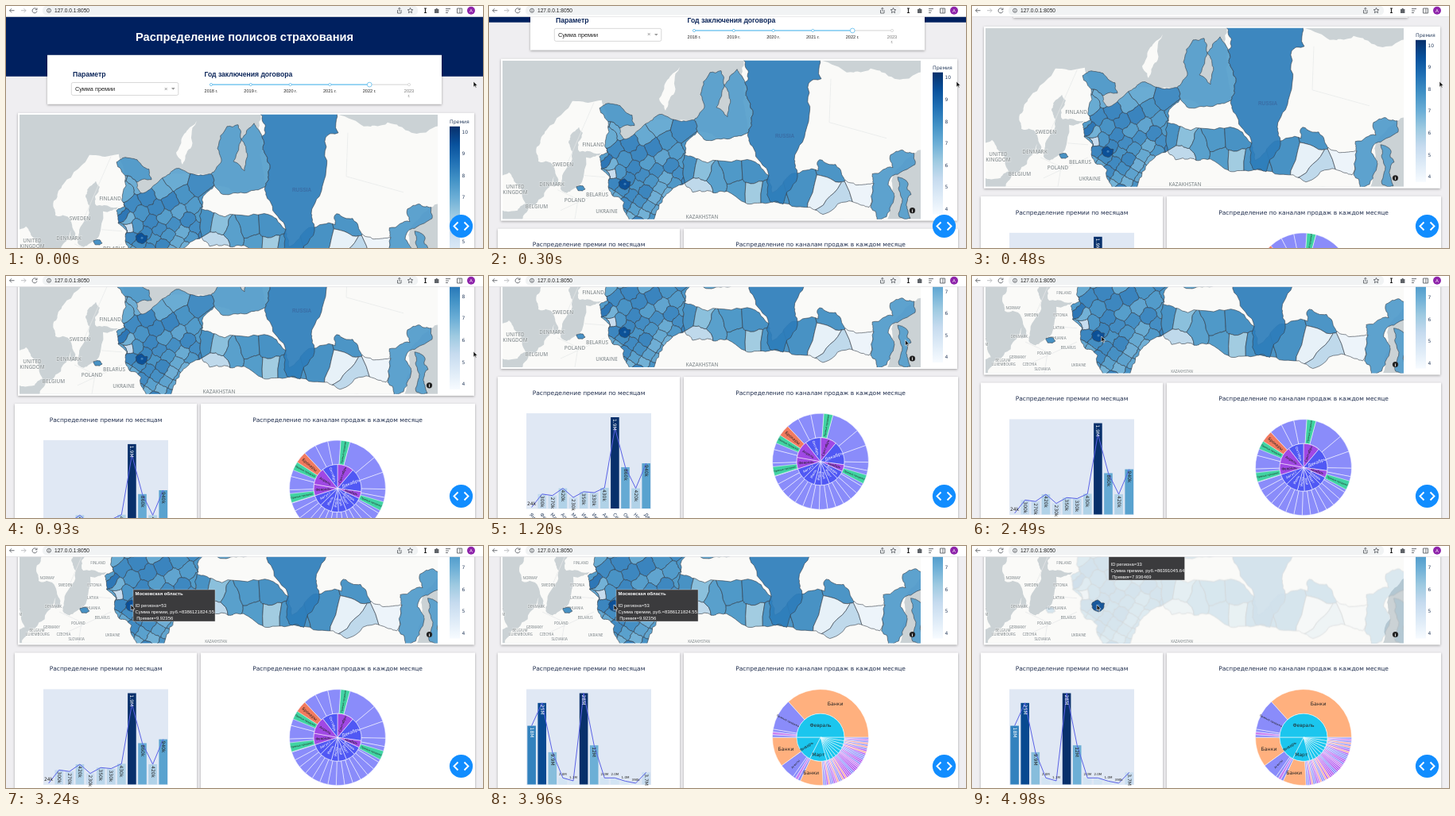
An HTML page for the animation above (5010 ms loop, 600 px wide and 305 px high).

```html
<!DOCTYPE html>
<html lang="ru">
<head>
<meta charset="utf-8">
<style>
html, body { margin: 0; width: 100%; height: 100%; overflow: hidden; background: #efeef1; }
svg { display: block; width: 600px; height: 305px; }
text { font-family: "Liberation Sans", Arial, sans-serif; }
.plot { font-family: "DejaVu Sans", Verdana, sans-serif; }
.geo { font-family: "Open Sans", sans-serif; font-weight: 600; fill: #8d9496; stroke: #fff; stroke-width: 1; stroke-opacity: .6; paint-order: stroke; }
.mid { text-anchor: middle; }
.region { stroke: #333b45; stroke-width: .6; fill-opacity: .92; vector-effect: non-scaling-stroke; stroke-linejoin: round; }
.card { fill: #fff; filter: drop-shadow(0 1px 1.5px #0005); }
</style>
</head>
<body>
<svg id="stage" viewBox="0 0 600 305"></svg>
<script>
const LOOP = 5010;
const BLUES = ['f7fbff', 'deebf7', 'c6dbef', '9ecae1', '6baed6', '4292c6', '2171b5', '08519c', '08306b'];
const clamp = (v, a = 0, b = 1) => Math.min(b, Math.max(a, v));
const smooth = u => u * u * (3 - 2 * u);
const mix = (a, b, f) => a.map((c, k) => c + (b[k] - c) * f);

function blues(t) {
  const p = clamp(t) * 8, i = Math.min(7, Math.floor(p));
  const rgb = hex => [0, 2, 4].map(k => parseInt(hex.slice(k, k + 2), 16));
  return `rgb(${mix(rgb(BLUES[i]), rgb(BLUES[i + 1]), p - i).map(Math.round)})`;
}
const premiumColor = v => blues((v - 3.73) / 6.47);

function hash(x, y) {
  const s = Math.sin(x * 12.9898 + y * 78.233) * 43758.5453;
  return s - Math.floor(s);
}

const text = (x, y, size, str, attrs = '') => `<text x="${x}" y="${y}" font-size="${size}" ${attrs}>${str}</text>`;
const rect = (x, y, w, h, fill, attrs = '') => `<rect x="${x}" y="${y}" width="${w}" height="${h}" fill="${fill}" ${attrs}/>`;
const parse = str => str.split(' ').map(p => p.split(',').map(Number));

/* Map: key points roughened into natural borders, split into Voronoi districts */

// Midpoint displacement seeded by the edge itself, so neighbours share borders.
function rough(points, depth = 3) {
  for (; depth > 0; depth--) {
    points = points.flatMap((p, i) => {
      const q = points[(i + 1) % points.length], [mx, my] = mix(p, q, .5);
      const amp = Math.min(5, Math.hypot(q[0] - p[0], q[1] - p[1]) * .3);
      const kx = Math.round(mx), ky = Math.round(my);
      return [p, [mx + (hash(kx, ky) - .5) * amp, my + (hash(ky, kx) - .5) * amp]];
    });
  }
  return 'M' + points.map(p => p.map(c => c.toFixed(1)).join(' ')).join('L') + 'Z';
}
const shape = (points, fill, attrs = '') => `<path d="${rough(points)}" fill="${fill}" ${attrs}/>`;
const region = (points, v) => shape(points, premiumColor(v), 'class="region"');

function voronoiCell([x, y], sites) {
  let cell = parse('100,100 600,100 600,400 100,400');
  for (const [sx, sy] of sites) {
    if (sx === x && sy === y) continue;
    const side = p => (p[0] - (x + sx) / 2) * (sx - x) + (p[1] - (y + sy) / 2) * (sy - y);
    cell = cell.flatMap((p, i) => {
      const q = cell[(i + 1) % cell.length], a = side(p), b = side(q);
      const kept = a < 0 ? [p] : [];
      if (a < 0 !== b < 0) kept.push(mix(p, q, a / (a - b)));
      return kept;
    });
  }
  return cell;
}

function districts(id, outline, sites) {
  const border = rough(parse(outline));
  return `<clipPath id="${id}"><path d="${border}"/></clipPath>
    <g clip-path="url(#${id})">${sites.map(s => region(voronoiCell(s, sites), s[2])).join('')}</g>
    <path d="${border}" fill="none" class="region"/>`;
}

const LAND = [
  '40,340 50,322 72,300 82,283 81,296 88,294 80,268 62,264 60,246 72,225 105,188 142,187 150,214 164,222 170,236 184,228 206,212 258,212 262,226 300,236 326,228 322,165 319,130 402,130 450,152 480,147 510,160 560,150 560,250 535,254 508,282 510,308 500,340',
  '222,200 214,185 222,165 240,145 232,180',
  '10,284 25,278 34,292 46,318 36,326 10,328'
];
const BALTIC = '105,228 113,221 118,228 112,240 114,252 145,253 122,259 114,294 98,304 90,299 92,286 105,252 100,240';
const EUROPE = '164,222 170,236 184,228 206,212 214,205 235,212 258,212 262,226 248,240 246,256 248,290 228,302 214,318 206,340 176,340 170,316 156,308 150,296 152,284 141,274 139,258 149,253 147,236 150,214';
const SIBERIA = '246,256 275,266 330,263 352,282 356,304 385,279 414,276 416,262 436,268 447,287 462,294 484,292 478,322 453,314 420,331 404,322 362,316 327,318 300,302 285,304 256,303 246,292';
const YAMAL = '258,212 270,198 266,180 278,152 292,150 296,170 286,196 300,208 302,182 296,168 312,148 322,165 325,185 332,205 326,228 300,236 280,238 262,226';
const YENISEI = '319,130 326,150 322,165 325,185 332,205 326,228 332,246 352,282 353,314 370,318 388,284 384,262 402,214 402,166 418,160 418,130';
const KOLA = '139,197 150,191 165,194 180,206 183,219 164,222 150,214';
const FAR_EAST = '484,292 482,280 508,272 505,256 518,250 535,254 536,268 508,282 502,294 510,308 500,334 488,337 480,322';
const SAKHALIN = '514,284 526,290 531,306 526,324 530,336 516,334 520,312';
const MOSCOW = '163,291 170,286 178,290 176,297 171,300 165,297';

// Small districts crowd towards the south; two north-western ones stand out.
const EUROPE_SITES = [[148, 264, 8.7], [155, 279, 5.4]];
for (let i = 0; i < 68; i++) {
  EUROPE_SITES.push([137 + 124 * (i * .618 % 1), 206 + 136 * ((i + .5) / 68) ** .6, 7 + 1.4 * hash(i, 5)]);
}
const SIBERIA_SITES = parse('250,274,8 264,296,5.6 268,278,6.6 285,286,7.6 305,278,7.8 312,302,7.7 333,278,8 334,302,6.2 352,304,7.9 398,292,8 428,272,7.9 421,297,4.3 438,313,5.6 468,304,4.1');

const LABELS = '131,245,FINLAND 93,270,SWEDEN 79,295,DENMARK 33,298,UNITED 33,305,KINGDOM 60,323,BELGIUM 108,315,POLAND 136,308,BELARUS 148,329,UKRAINE 268,336,KAZAKHSTAN';
const NEAR_LABELS = '72,262,NORWAY 127,270,ESTONIA 125,285,LATVIA 123,297,LITHUANIA 77,319,GERMANY 61,328,LUXEMBOURG 91,328,CZECHIA 106,333,SLOVAKIA';
const geoLabels = rows => rows.split(' ').map(row => {
  const [x, y, name] = row.split(',');
  return `<text x="${x}" y="${y}" class="geo mid">${name}</text>`;
}).join('');

function mapCard() {
  let ticks = '';
  for (let v = 4; v <= 10; v++) ticks += text(573.5, 160.8 + (10 - v) * 27.6, 6, v, 'class="plot" fill="#2a3f5f"');
  return rect(15, 135, 574, 204, '#fff', 'class="card"') +
    `<g clip-path="url(#mapBox)">
      ${rect(17, 137, 526, 200, '#cbd2d5')}
      <g id="map">
        ${LAND.map(s => shape(parse(s), '#fafaf8')).join('')}${shape(parse(BALTIC), '#cbd2d5')}
        <path d="M86 300L112 312 108 337M120 282L146 284M146 300L90 326M98 268L132 190M430 160L428 215 500 235" fill="none" stroke="#e6e8e9" stroke-width=".7"/>
        <g id="labels">${geoLabels(LABELS)}<g id="near">${geoLabels(NEAR_LABELS)}</g></g>
        <g id="regions">
          ${districts('europe', EUROPE, EUROPE_SITES)}${districts('siberia', SIBERIA, SIBERIA_SITES)}
          ${region(parse(KOLA), 7.6)}${region(parse(YAMAL), 7.4)}${region(parse(YENISEI), 8.3)}
          ${region(parse(FAR_EAST), 7.5)}${region(parse(SAKHALIN), 7.4)}${region(parse('110,296 118,295 121,299 112,301'), 8)}
        </g>
        ${region(parse(MOSCOW), 9.5)}<circle cx="171" cy="292.5" r="1.5" fill="#3f7fba"/>
      </g>
      ${text(372, 234, 6.4, 'RUSSIA', 'id="russia" class="mid" fill="#3a6ea5" font-weight="700"')}
      <circle cx="532.5" cy="326" r="3.6" fill="#222"/>${text(532.5, 328.4, 6, 'i', 'class="mid" fill="#fff" font-weight="700"')}
    </g>` +
    text(558, 148, 6.2, 'Премия', 'class="plot" fill="#2a3f5f"') +
    rect(558, 152, 13, 179, 'url(#blues)') + ticks;
}

/* Controls */
function controls() {
  let slider = rect(258, 98.4, 250, 1.8, '#e6e6e6', 'rx="1"') + rect(258, 98.4, 199, 1.8, '#8fd2f5', 'rx="1"');
  for (let i = 0; i < 6; i++) {
    const x = 258 + i * 49.8, past = i < 5, ink = `class="mid" fill="${past ? '#222' : '#777'}"`;
    slider += `<circle cx="${x}" cy="99.3" r="${i === 4 ? 2.9 : 1.6}" fill="#fff" stroke="${past ? '#7cc8f0' : '#dcdcdc'}"/>` +
      text(x, 109.3, 5.6, `${2018 + i}${past ? ' г.' : ''}`, ink) + (past ? '' : text(x, 115.5, 5.6, 'г.', ink));
  }
  const heading = 'fill="#0b2559" font-weight="700"';
  return rect(0, 0, 600, 89, '#00205f') +
    text(300, 44, 14.6, 'Распределение полисов страхования', 'class="mid" fill="#fff" font-weight="700"') +
    rect(52, 62, 496, 62, '#fff', 'class="card"') +
    text(84, 89, 8.6, 'Параметр', heading) + text(249.5, 89, 8.6, 'Год заключения договора', heading) +
    rect(82.3, 96.7, 134.5, 16, '#fff', 'rx="2" stroke="#c8c8c8" stroke-width=".7"') +
    text(87, 107.3, 7.3, 'Сумма премии', 'fill="#222"') +
    text(199, 106.8, 7.5, '×', 'fill="#888"') + '<path d="M208 103.3h4.6l-2.3 2.6z" fill="#999"/>' + slider;
}

/* Bar charts */
const MONTHS = 'Янв Фев Мар Апр Май Июн Июл Авг Сен Окт Ноя Дек'.split(' ');
const ALL_SALES = { labels: '24k 300k 270k 420k 230k 350k 330k 430k 1.9M 860k 420k 940k', top: 1.9e6, peak: .88, flat: 1e5, small: 6 };
const REGION_SALES = { labels: '18M 25M 9.9M 2.0M 1.1M 28M 12M 2.0M 2.0M 1.0M 390k 3.7M', top: 28e6, peak: 1, flat: 3e6, small: 4 };

function barChart(id, { labels, top, peak, flat, small }) {
  const base = 515, line = [];
  let bars = '', marks = '';
  labels.split(' ').forEach((label, i) => {
    const value = parseFloat(label) * (label.endsWith('M') ? 1e6 : 1e3);
    const t = value / top, h = t * 115, x = 53.6 + i * 13.1, y = base - h;
    bars += rect(x - 5.3, y, 10.6, h, blues(.12 + .88 * t));
    line.push(`${x} ${base - h * (t === 1 ? peak : 1)}`);
    marks += value < flat ? text(x, y - 3, small, label, 'class="plot mid" fill="#222"')
      : text(0, 0, 6, label, `class="plot" fill="${t > .55 ? '#fff' : '#222'}" transform="translate(${x - 2} ${y + 2}) rotate(90)"`);
    marks += text(0, 0, 6, MONTHS[i], `class="plot" fill="#2a3f5f" transform="translate(${x - 3} 523) rotate(45)"`);
  });
  return `<g id="${id}">${rect(47, 395, 157, 120.5, '#e0e8f4')}${bars}
    <path d="M${line.join('L')}" fill="none" stroke="#5a62e6"/>${marks}</g>`;
}

/* Sunbursts: angles in degrees, counter-clockwise from the right */
const CX = 417, CY = 455.7, INNER = 30, OUTER = 60.5;
const VIOLET = '#8a8cfa', GREEN = '#40d3a2', BLUE = '#5058f4', PURPLE = '#a048e4', ORANGE = '#ffb07e', CYAN = '#1bc6ee';
const polar = (r, a) => [CX + r * Math.cos(a * Math.PI / 180), CY - r * Math.sin(a * Math.PI / 180)];

function sector(r0, r1, from, to, fill) {
  const large = from - to > 180 ? 1 : 0, p = (r, a) => polar(r, a).map(c => c.toFixed(2)).join(' ');
  return `<path d="M${p(r1, from)}A${r1} ${r1} 0 ${large} 1 ${p(r1, to)}L${p(r0, to)}A${r0} ${r0} 0 ${large} 0 ${p(r0, from)}Z" fill="${fill}" stroke="#fff" stroke-width=".5"/>`;
}
function tag(r, a, size, str, ink = '#222', radial = true) {
  const [x, y] = polar(r, a), turn = !radial ? 0 : Math.cos(a * Math.PI / 180) < 0 ? 180 - a : -a;
  return text(0, size * .35, size, str, `class="plot mid" fill="${ink}" transform="translate(${x} ${y}) rotate(${turn})"`);
}
const outer = (from, to, fill) => sector(INNER, OUTER, from, to, fill);
const inner = (from, to, fill) => sector(0, INNER, from, to, fill);
// Fills an arc with slices about `step` degrees wide.
function slices(draw, from, to, step, colorOf) {
  const n = Math.round((from - to) / step), w = (from - to) / n;
  let out = '';
  for (let i = 0; i < n; i++) out += draw(from - i * w, from - (i + 1) * w, colorOf(i));
  return out;
}

function allChannels() {
  const violet = () => VIOLET;
  let out = outer(75, 40, VIOLET) + slices(outer, 40, -1, 20, violet) + slices(outer, -1, -162, 10, violet) +
    slices(outer, -162, -227, 15, violet) + slices(outer, -227, -274, 16, violet);
  for (const mid of [80.5, -22, -168, -208]) out += outer(mid + 5.5, mid - 5.5, GREEN) + tag(46, mid, 3, 'Прямые продажи');
  out += outer(-213, -227, '#f27a5e') + tag(46, -220, 5, 'Брокеры');
  const months = [['Сентябрь', 40, PURPLE], ['Декабрь', 58, BLUE], ['Ноябрь', 17, PURPLE], ['Январь', 20, BLUE],
    ['Март', 23, BLUE], ['Май', 20, BLUE], ['Июнь', 17, BLUE], ['Июль', 30, BLUE], ['Август', 27, BLUE],
    ['Февраль', 28, PURPLE], ['Апрель', 42, PURPLE], ['Октябрь', 38, BLUE]];
  let from = 90;
  for (const [name, span, fill] of months) {
    out += inner(from, from - span, fill) + tag(18, from - span / 2, span > 50 ? 5.4 : 4.3, name, fill === BLUE ? '#fff' : '#222');
    from -= span;
  }
  return `<g id="sunAll">${out}</g>`;
}

function regionChannels() {
  const mixed = i => ['#b45cf0', VIOLET, '#c77df2', VIOLET, '#f7a6a0'][Math.floor(hash(i, 3) * 5)];
  const cyan = () => CYAN;
  return `<g id="sunRegion">${outer(132, 0, ORANGE)}${slices(outer, 0, -87, 2.2, mixed)}${outer(-87, -115, ORANGE)}
    ${slices(outer, -115, -125, 3, mixed)}${outer(-125, -144, VIOLET)}${outer(-144, -180, ORANGE)}
    ${slices(outer, -180, -190, 3, mixed)}${outer(-190, -228, VIOLET)}
    ${inner(180, 0, CYAN)}${slices(inner, 0, -75, 8, cyan)}${inner(-75, -117, CYAN)}${inner(-117, -180, CYAN)}
    ${[66, 199, 255].map(a => tag(46, a, 6.2, 'Банки', '#222', false)).join('')}
    ${tag(46, 153, 3.4, 'Прямые продажи')}${tag(46, 227, 3.6, 'Агенты')}
    ${tag(15, 90, 6, 'Февраль', '#222', false)}${tag(21, 213, 5, 'Январь')}${tag(22, 263, 6, 'Март', '#222', false)}</g>`;
}

function charts() {
  const title = 'class="plot mid" fill="#1f2d4d"';
  return rect(11, 349, 229, 220, '#fff', 'class="card"') + rect(245, 349, 345, 220, '#fff', 'class="card"') +
    text(125.5, 371.7, 7.5, 'Распределение премии по месяцам', title) +
    text(417, 371.7, 7.5, 'Распределение по каналам продаж в каждом месяце', title) +
    barChart('barsAll', ALL_SALES) + barChart('barsRegion', REGION_SALES) + allChannels() + regionChannels();
}

/* Fixed layers */
const browserBar = rect(0, 0, 600, 13.6, '#fff') + rect(46, 0, 472, 11.5, '#f1f3f4', 'rx="5"') + rect(0, 13, 600, .6, '#d9d9dc') +
  `<g fill="none" stroke="#5f6368" stroke-width=".9">
    <path d="M10.5 5.7H4.5M7 3.2L4.5 5.7 7 8.2"/><path d="M19 5.7h6M22.5 3.2L25 5.7 22.5 8.2" stroke="#b8babd"/>
    <path d="M38.6 4.2A3 3 0 1 0 39 6.5M39 2.5v2.2h-2.2"/><circle cx="54" cy="5.7" r="2.5"/><path d="M54 5.3v1.8M54 4v.6"/>
    <path d="M492.5 5v4h4.5V5M494.8 6.8V2.3M493.3 3.6l1.5-1.5 1.5 1.5"/>
    <path d="M508.5 2.3l1 2.2 2.3.2-1.8 1.6.6 2.4-2.1-1.3-2.1 1.3.6-2.4-1.8-1.6 2.3-.2z"/>
    <path d="M553 3.5h6M553 6h4M553 8.500h3M567.5 3h6v6h-6zM571 3v6"/></g>
  <path d="M539 4h1.500a1.200 1.200 0 0 1 2.400 0h1.500v5h-5.400z" fill="#5f6368"/>
  <path d="M526 3h3M527.500 3v5.500M526 8.500h3" stroke="#222" stroke-width="1.200"/>
  <circle cx="585" cy="5.700" r="5" fill="#8e24aa"/>` +
  text(585, 7.8, 5.8, 'A', 'class="mid" fill="#fff"') + text(61, 8, 6.6, '127.0.0.1:8050', 'fill="#222"');

const devButton = `<circle cx="572.5" cy="277.5" r="14.6" fill="#118dff"/>
  <path d="M568.5 272.5l-5 5 5 5M576.5 272.5l5 5-5 5" fill="none" stroke="#fff" stroke-width="1.9"/>`;

function tooltip(id, x, y, w, [name, ...details]) {
  return `<g id="${id}">${rect(x, y, w, 40, '#3b3b3d', 'stroke="#ddd" stroke-width=".4"')}
    ${text(x + 2.5, y + 6.8, 5.9, name, 'fill="#fff" font-weight="700"')}
    ${details.map((s, i) => text(x + 2.5, y + 21.5 + i * 8, 5.9, s, 'fill="#fff"')).join('')}</g>`;
}

document.getElementById('stage').innerHTML = `<defs>
    <linearGradient id="blues" x1="0" y1="1" x2="0" y2="0">${BLUES.map((c, i) => `<stop offset="${i / 8}" stop-color="#${c}"/>`).join('')}</linearGradient>
    <clipPath id="mapBox">${rect(17, 137, 526, 200, '#000')}</clipPath>
  </defs>
  ${rect(0, 0, 600, 305, '#efeef1')}
  <g id="page">${controls()}${mapCard()}${charts()}</g>
  ${tooltip('tipMoscow', 160, 55, 103, ['Московская область', 'ID региона=53', 'Сумма премии, руб.=8386121824.55', '&#160;Премия=9.92356'])}
  ${tooltip('tipNext', 172, 3, 95.5, ['Владимирская область', 'ID региона=33', 'Сумма премии, руб.=86391045.64', '&#160;Премия=7.936469'])}
  ${browserBar}${devButton}
  <path id="cursor" d="M0 0V7.2L1.7 5.7 2.8 8.2 3.9 7.7 2.8 5.3H5z" fill="#111" stroke="#fff" stroke-width=".6"/>`;

/* Timeline: each key is [time, ...values] */
const SCROLL = [[0, 0], [480, 109], [930, 188], [1200, 222], [1530, 222], [1620, 214.5], [LOOP, 214.5]];
const CURSOR = [[0, 588, 95], [1080, 588, 95], [1470, 307, 32], [1980, 307, 32], [2430, 163, 76], [3000, 157, 74], [LOOP, 157, 74]];

function track(keys, t, ease = u => u) {
  const i = keys.findIndex(k => k[0] > t);
  const [t0, ...a] = keys[i - 1], [t1, ...b] = keys[i];
  return mix(a, b, ease((t - t0) / (t1 - t0)));
}

const el = Object.fromEntries([...document.querySelectorAll('#stage [id]')].map(n => [n.id, n]));
const show = (ids, on) => ids.split(' ').forEach(id => { el[id].style.display = on ? '' : 'none'; });

function render(t) {
  el.page.setAttribute('transform', `translate(0 ${-track(SCROLL, t)[0]})`);
  el.cursor.setAttribute('transform', `translate(${track(CURSOR, t, smooth)})`);

  const zoom = 1 + .083 * smooth(clamp((t - 1680) / 360)), close = zoom > 1.05;
  el.map.setAttribute('transform', `translate(315 329.5) scale(${zoom}) translate(-315 -329.5)`);
  el.labels.setAttribute('font-size', close ? 4 : 6.4);
  show('near', close);
  show('russia', !close);

  const selected = t >= 3870;
  show('barsAll sunAll', !selected);
  show('barsRegion sunRegion', selected);
  el.regions.setAttribute('opacity', 1 - .8 * clamp((t - 4350) / 240));
  show('tipMoscow', t >= 2730 && t < 4590);
  show('tipNext', t >= 4590);
}

function frame(now) {
  render(now % LOOP);
  requestAnimationFrame(frame);
}
render(0);
requestAnimationFrame(frame);
</script>
</body>
</html>
```
